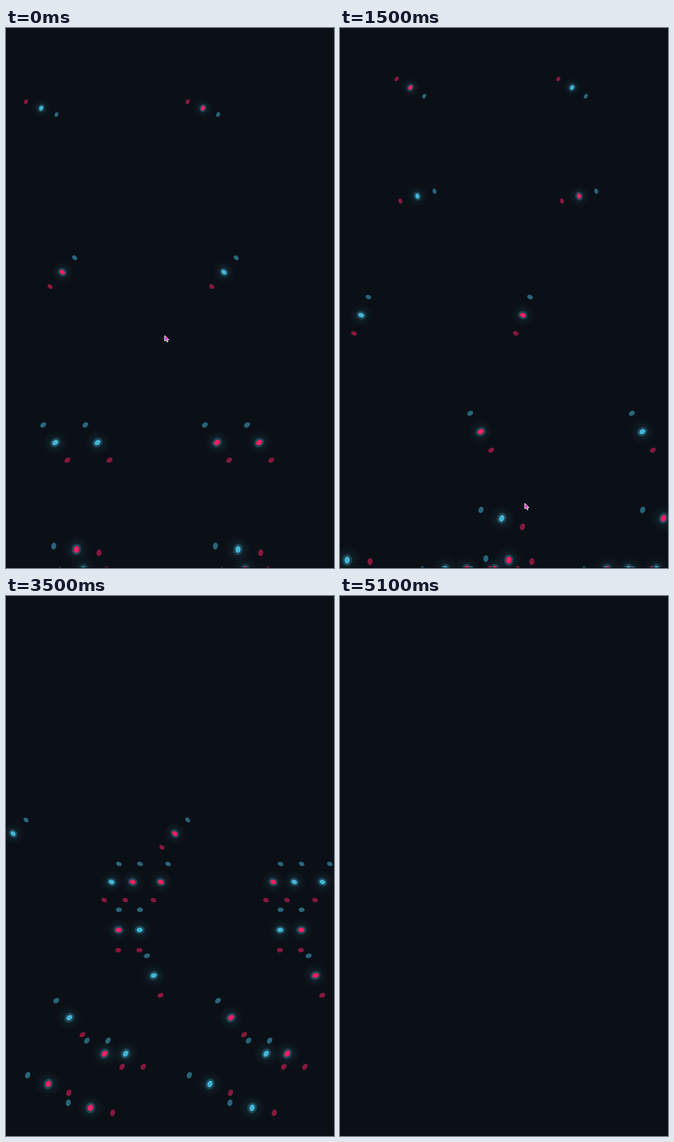
An HTML page with a canvas that plays this animation: 584x959 px, repeating every 5.5 s.

```html
<!DOCTYPE html>
<html>
<head>
<meta charset="utf-8">
<style>
  html, body { margin: 0; width: 100%; height: 100%; overflow: hidden; background: #0b1017; }
  canvas { display: block; }
</style>
</head>
<body>
<canvas id="stage" width="584" height="959"></canvas>
<script>
const ctx = document.getElementById('stage').getContext('2d');
const LOOP = 5500, LAST_STEP = 5100, STEP = 100;
const SPACING = 12.515, FIRST_X = 12.7, COLUMNS = 23;
const CYAN = '#43b5d5', PINK = '#ff2064';

// Height of the slowest bubble's path, one point every half second from 0.5 s.
const PATH = [964, 960, 945, 875, 757, 598, 422, 255, 100, -45, -170];

// Columns by rank; each rank lags the one before and rises faster.
const WAVES = [
  { start: 4.36, rate: 1.31, ranks: [[4], [7], [6, 12], [9], [10], [2], [19], [22]] },
  { start: 0, rate: 1, ranks: [[0], [14, 17, 21], [15, 18], [20], [8], [13, 16], [5], [11]] }
];

const bubbles = [];
for (const { start, rate, ranks } of WAVES)
  ranks.forEach((columns, rank) => {
    for (const c of columns)
      for (const column of [c, c + COLUMNS]) bubbles.push({ column, start, rate, rank });
  });
bubbles.sort((a, b) => a.column - b.column);

function pathHeight(time) {
  const pos = (time - 0.5) * 2, i = Math.floor(pos), u = pos - i;
  const at = j => PATH[Math.max(0, Math.min(PATH.length - 1, j))];
  const [a, b, c, d] = [at(i - 1), at(i), at(i + 1), at(i + 2)];
  return b + u / 2 * (c - a + u * (2 * a - 5 * b + 4 * c - d + u * (3 * (b - c) + d - a)));
}

function oval(x, rx, ry, color, alpha) {
  ctx.globalAlpha = alpha;
  ctx.fillStyle = color;
  ctx.beginPath();
  ctx.ellipse(x, 0, rx, ry, 0, 0, Math.PI * 2);
  ctx.fill();
}

const glow = ctx.createRadialGradient(0, 0, 0, 0, 0, 26);
[[0, 0.13], [0.4, 0.075], [0.75, 0.02], [1, 0]].forEach(([stop, alpha]) =>
  glow.addColorStop(stop, `rgba(79,195,220,${alpha})`));

function drawBubble({ column, start, rate, rank }, t) {
  const time = start + rate * t - rank * 0.186 * (4.805 - t);
  if (time < 0.55 || time > 5.5) return;
  const y = pathHeight(time), risen = 960 - y;
  const scale = 1 - risen * 0.00035;
  ctx.save();
  ctx.translate(FIRST_X + column * SPACING, y);
  ctx.rotate(risen * 0.248 * Math.PI / 180);
  ctx.scale(scale, scale);
  oval(-41.2, 4.5, 6.2, CYAN, 0.52);
  oval(41.2, 4.5, 6.2, PINK, 0.5);
  oval(0, 26, 26, glow, 1);
  oval(0, 8.6, 10.3, CYAN, 0.25);
  oval(0, 4.6, 6.2, column % 2 ? PINK : CYAN, 1);
  ctx.restore();
}

const POINTER = [[0, 282.5, 546], [0.7, 282.5, 546], [1.5, 329, 844], [2.3, 308, 944], [2.5, 303, 970]];
const ARROW = [[0, 0], [0, 10], [2.5, 8], [4.5, 12], [6, 11], [4.5, 7.5], [7.5, 7.5]];

function drawPointer(t) {
  const next = POINTER.findIndex(p => p[0] > t);
  if (next < 0) return;
  const [t0, x0, y0] = POINTER[next - 1], [t1, x1, y1] = POINTER[next];
  const u = (t - t0) / (t1 - t0);
  ctx.save();
  ctx.translate(x0 + (x1 - x0) * u, y0 + (y1 - y0) * u);
  ctx.beginPath();
  ARROW.forEach(([x, y]) => ctx.lineTo(x, y));
  ctx.closePath();
  ctx.fillStyle = '#e32fc8';
  ctx.strokeStyle = '#fff';
  ctx.fill();
  ctx.stroke();
  ctx.restore();
}

function draw(now) {
  const t = Math.min(LAST_STEP, Math.floor(now % LOOP / STEP) * STEP) / 1000;
  ctx.globalAlpha = 1;
  ctx.fillStyle = '#0b1017';
  ctx.fillRect(0, 0, 584, 959);
  bubbles.forEach(b => drawBubble(b, t));
  ctx.globalAlpha = 1;
  drawPointer(t);
  ctx.fillStyle = '#05080c';
  ctx.fillRect(0, 958, 584, 1);
}

const began = performance.now();
function tick() {
  draw(performance.now() - began);
  requestAnimationFrame(tick);
}
tick();
</script>
</body>
</html>
```
